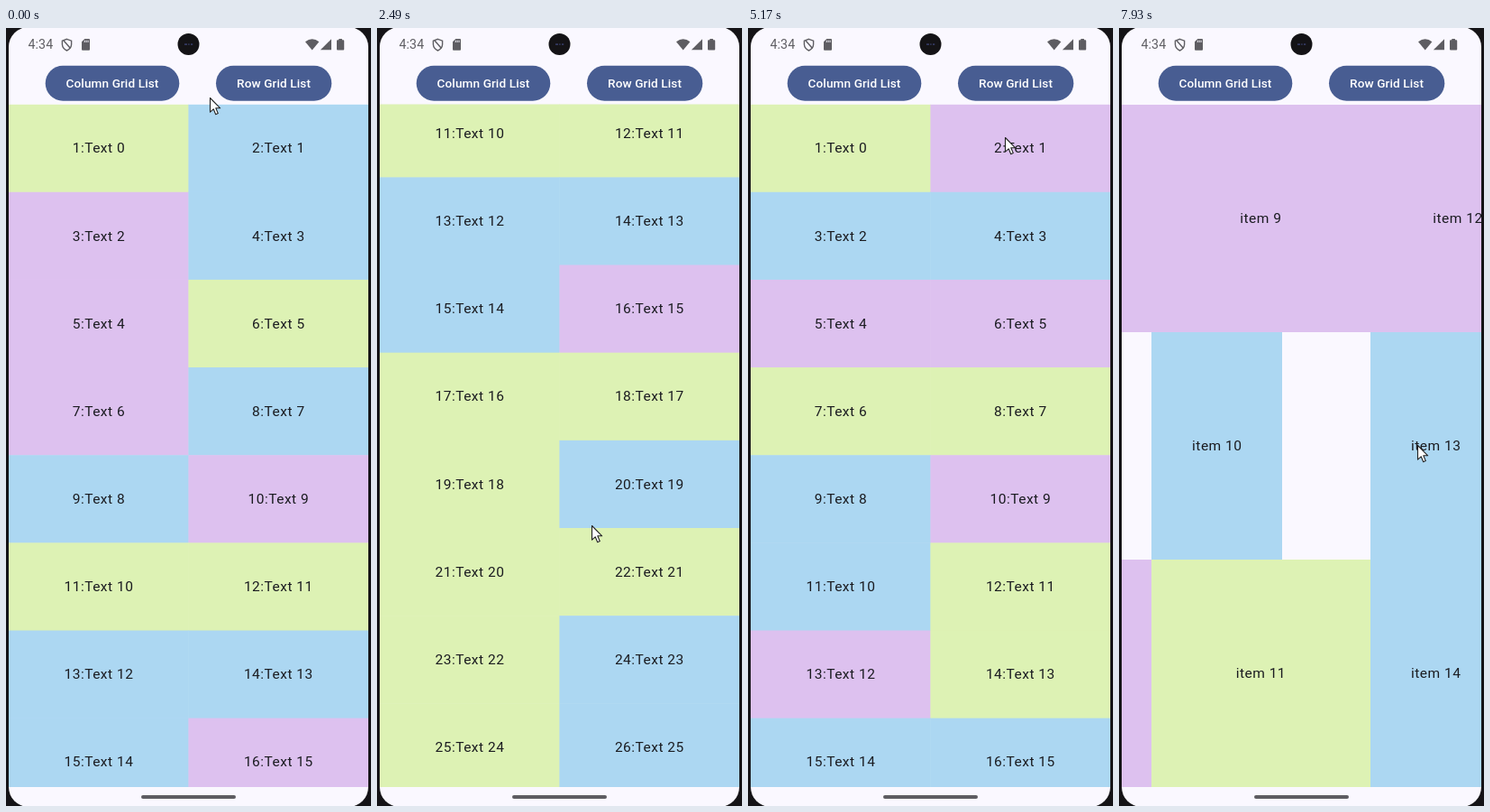
Recreate the animation shown at these times as an HTML page. Size 405 by 862 pixels, loop 8 s.

```html
<!DOCTYPE html>
<html lang="en">
<head>
<meta charset="utf-8">
<title>Grid lists</title>
<style>
  html, body { margin: 0; width: 100%; height: 100%; overflow: hidden; background: #141316; }
  svg { display: block; width: 100%; height: 100%; font-family: Roboto, sans-serif; }
  .cell { font-size: 15.54px; letter-spacing: .486px; fill: #1a1b20; text-anchor: middle; }
  .label { font-size: 13.6px; font-weight: 500; letter-spacing: .1px; fill: #fff; text-anchor: middle; }
  .button { fill: #485d92; }
  .icon { fill: #5e5d62; }
  #rows rect { shape-rendering: crispEdges; }
</style>
</head>
<body>
<svg viewBox="0 0 405 862">
  <defs>
    <clipPath id="view"><rect x="3" y="84.6" width="399" height="756.4"/></clipPath>
  </defs>
  <rect width="405" height="862" fill="#141316"/>
  <rect x="3" y="-1" width="399" height="864" rx="22" fill="#faf8ff"/>

  <g class="icon">
    <text x="24.5" y="23.3" font-size="14.2" letter-spacing=".1">4:34</text>
    <path d="M67.5 12.3 72.6 14.2V18.3Q72.3 22.8 67.5 25Q62.7 22.8 62.4 18.3V14.2Z" fill="none" stroke="#5e5d62" stroke-width="1.4"/>
    <path d="M64 14 71.5 22.5" stroke="#5e5d62" stroke-width="1.4"/>
    <path d="M87.3 12H92Q93 12 93 13V23.7Q93 24.8 92 24.8H85Q84 24.8 84 23.7V15.3Z"/>
    <path d="M87.3 13.6V16M89.2 13.6V16M91.1 13.6V16" stroke="#faf8ff" stroke-width=".9"/>
    <path d="M332 15.3Q339.7 9 347.4 15.3L339.7 24.6Z"/>
    <path d="M361 12.2V24.3H348.9Z"/>
    <path d="M369.3 12H372.9V13.3H374.2Q375.2 13.3 375.2 14.3V23.4Q375.2 24.4 374.2 24.4H368Q367 24.4 367 23.4V14.3Q367 13.3 368 13.3H369.3Z"/>
  </g>
  <circle cx="202.5" cy="18" r="12" fill="#141316"/>
  <path d="M198 18.2H201M202.2 18.2H203.6M205 18.2H207.2" stroke="#33395f" stroke-width="1.8"/>

  <rect class="button" x="43.7" y="41.8" width="148.6" height="38.9" rx="19.45"/>
  <text class="label" x="118" y="66">Column Grid List</text>
  <rect class="button" x="233" y="41.8" width="128.3" height="38.9" rx="19.45"/>
  <rect id="ripple" x="233" y="41.8" width="128.3" height="38.9" rx="19.45" fill="#fff" opacity="0"/>
  <text class="label" x="297.1" y="66">Row Grid List</text>

  <g clip-path="url(#view)">
    <g id="columns"></g>
    <g id="rows"></g>
  </g>
  <rect x="150" y="850" width="105" height="4" rx="2" fill="#5e5d62"/>

  <circle id="press" r="12.5" fill="#f0dc72" opacity=".93"/>
  <path id="cursor" d="M.5.5V16.2L4.2 12.8 6.7 18.7 9.3 17.6 6.8 11.8H11.7Z" fill="#fff" stroke="#222" stroke-width="1.1" stroke-linejoin="round"/>
</svg>

<script>
const LOOP = 8000, DP = 0.9715, LEFT = 3, TOP = 84.6, HALF = 199.4, ROW = 100 * DP;
const COLORS = { G: '#ddf2b4', B: '#acd7f2', P: '#ddc1ef' };

// Cell colours, row by row; the upper rows get new ones when they scroll back in
const FIRST = 'GB PB PG PB BP GG BB BP GG GB GG GB GB GP BG BP'.split(' ');
const AGAIN = 'GP BB PP GG BP BG PG BB'.split(' ');

// The sideways grid: three items per column, each 150, 200 or 250 dp wide
const ITEMS = 'PPPPPPPBPPBGPBB', SIZES = '101221101202100';

const smooth = u => u * u * (3 - 2 * u);
const steady = u => u;
const flick = u => u ** 3;
const slowDown = u => 1 - (1 - u) ** 3;
const progress = (t, from, to) => Math.min(1, Math.max(0, (t - from) / (to - from)));
const pulse = (t, from, to) => Math.sin(Math.PI * progress(t, from, to));

// Pointer stops: arrival time, place, way of getting there
const STOPS = [
  [0, 226, 77], [90, 226, 90], [420, 226, 90], [1030, 220, 577],
  [1100, 220, 577], [2000, 218, 320, flick],
  [2490, 238, 551], [2560, 238, 551], [2840, 249, 300, flick],
  [3440, 249, 300], [3720, 262, 620, flick],
  [4600, 264, 620], [5170, 285, 121], [5450, 296, 50],
  [6210, 296, 50], [6800, 301, 406],
  [6860, 301, 406], [7000, 119, 418, steady], [7600, 331, 462]
];

// Drags end in a fling that comes to rest at a given offset
const COLUMN_DRAGS = [
  { down: 1100, up: 2000, rest: 2490, offset: 502.1 },
  { down: 2560, up: 2840, rest: 3370, offset: 794.4 },
  { down: 3440, up: 3720, rest: 4490, offset: 0 }
];
const ROW_DRAGS = [{ down: 6860, up: 7000, rest: 7930, offset: 598.8 }];
const TAP = { down: 5480, up: 5600 }, SWITCH = 5700;
const PRESSES = [...COLUMN_DRAGS, TAP];
const SLOP = 8, LAG = 38;

const byId = id => document.getElementById(id);
const [columns, rows, cursor, press, ripple] = ['columns', 'rows', 'cursor', 'press', 'ripple'].map(byId);

function add(parent, tag, attrs, text = '') {
  const node = document.createElementNS('http://www.w3.org/2000/svg', tag);
  for (const name in attrs) node.setAttribute(name, attrs[name]);
  node.textContent = text;
  parent.append(node);
  return node;
}

// The overlap hides seams under the next cell
function addCell(parent, x, y, width, height, color, text, overlap = 0) {
  const rect = add(parent, 'rect', { x, y, width: width + overlap, height: height + overlap, fill: COLORS[color] });
  return [rect, add(parent, 'text', { class: 'cell', x: x + width / 2 + .25, y: y + height / 2 + 5.2 }, text)];
}

const recycled = [];
FIRST.forEach((pair, r) => [...pair].forEach((color, c) => {
  const n = 2 * r + c;
  const [rect] = addCell(columns, LEFT + c * HALF, TOP + r * ROW, HALF, ROW, color, `${n + 1}:Text ${n}`, .5);
  if (AGAIN[r]) recycled.push([rect, color, AGAIN[r][c]]);
}));

let left = LEFT;
for (let i = 0; i < ITEMS.length; i += 3) {
  const widths = [0, 1, 2].map(k => (150 + 50 * SIZES[i + k]) * DP);
  widths.forEach((w, k) => addCell(rows, left, 85 + k * 252, w, 252, ITEMS[i + k], `item ${i + k}`));
  left += Math.max(...widths);
}

function pointerAt(t) {
  const next = STOPS.findIndex(stop => stop[0] > t);
  if (next < 0) return STOPS[STOPS.length - 1].slice(1, 3);
  const [t0, x0, y0] = STOPS[next - 1];
  const [t1, x1, y1, ease = smooth] = STOPS[next];
  const u = ease(progress(t, t0, t1));
  return [x0 + (x1 - x0) * u, y0 + (y1 - y0) * u];
}

// The list follows the finger a little late, then flings to rest
function offsetAt(drags, axis, t) {
  let offset = 0;
  for (const { down, up, rest, offset: target } of drags) {
    const seen = Math.min(t - LAG, up);
    if (seen < down) break;
    const pull = pointerAt(down)[axis] - pointerAt(seen)[axis];
    offset += Math.sign(pull) * Math.max(0, Math.abs(pull) - SLOP);
    offset += (target - offset) * slowDown(progress(t, up + LAG, rest));
  }
  return offset;
}

function draw(t) {
  const place = `translate(${pointerAt(t).join(' ')})`;
  cursor.setAttribute('transform', place);
  press.setAttribute('transform', place);
  press.style.display = PRESSES.some(({ down, up }) => t >= down && t < up) ? '' : 'none';
  ripple.setAttribute('opacity', .12 * pulse(t, TAP.down, 6350));

  columns.style.display = t < SWITCH ? '' : 'none';
  rows.style.display = t < SWITCH ? 'none' : '';
  const stretch = 1 + .02 * pulse(t, 4450, 4900);
  const scroll = offsetAt(COLUMN_DRAGS, 1, t);
  columns.setAttribute('transform', `translate(0 ${TOP * (1 - stretch) - scroll}) scale(1 ${stretch})`);
  rows.setAttribute('transform', `translate(${-offsetAt(ROW_DRAGS, 0, t)} 0)`);

  const scrolledBack = t > COLUMN_DRAGS[2].down;
  for (const [rect, before, after] of recycled) {
    rect.setAttribute('fill', COLORS[scrolledBack ? after : before]);
  }
}

const start = performance.now();
function frame() {
  draw((performance.now() - start) % LOOP);
  requestAnimationFrame(frame);
}
frame();
</script>
</body>
</html>
```
